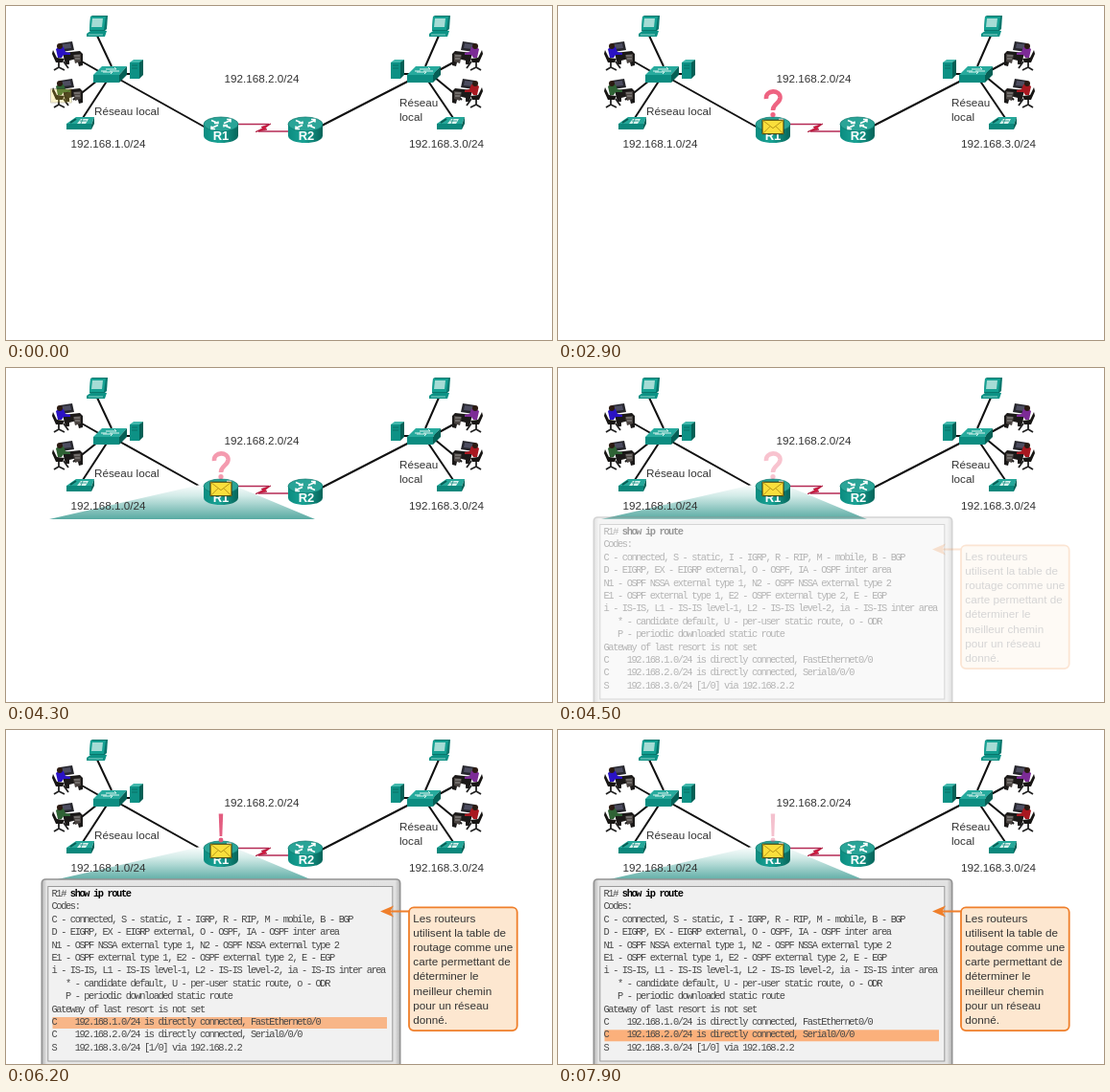
Animation, 569 px wide and 349 px high, one loop 8000 ms. Source, as an HTML page:

```html
<!DOCTYPE html>
<html lang="fr">
<head>
<meta charset="utf-8">
<title>Table de routage</title>
<style>
  html, body { margin: 0; width: 100%; height: 100%; overflow: hidden; background: #fff; }
  svg { display: block; width: 569px; height: 349px; }
  text { font: 11.7px "Liberation Sans", Arial, sans-serif; fill: #333; white-space: pre; }
  #console text { font: 10.4px "Liberation Mono", "Courier New", monospace; letter-spacing: -1.41px; fill: #484848; }
  text.router { font-weight: bold; font-size: 13px; fill: #fff; }
  .wire { fill: none; stroke: #111; stroke-width: 2; }
</style>
</head>
<body>
<svg viewBox="0 0 569 349">
  <defs>
    <linearGradient id="coneFill" x1="0" y1="0" x2="0" y2="1">
      <stop offset=".1" stop-color="#fff"/><stop offset=".4" stop-color="#d3ebe8"/><stop offset="1" stop-color="#58aaa2"/>
    </linearGradient>
    <linearGradient id="frameFill" x1="0" y1="0" x2="1" y2="0">
      <stop offset="0" stop-color="#b4b4b4"/><stop offset=".014" stop-color="#e6e6e6"/>
      <stop offset=".986" stop-color="#e2e2e2"/><stop offset="1" stop-color="#b4b4b4"/>
    </linearGradient>
    <linearGradient id="drum">
      <stop offset="0" stop-color="#0b8c80"/><stop offset=".45" stop-color="#1aa395"/><stop offset="1" stop-color="#056459"/>
    </linearGradient>
    <g id="pc">
      <path d="M4 2 6 1H22L21 15 19 17H3Z" fill="#08766c"/>
      <path d="M4 2H20L18 16H3Z" fill="#15a092"/>
      <path d="M6 4H17L16 13H5Z" fill="#a5dcd5"/>
      <path d="M0 20 4 17H21L19 23H0Z" fill="#0d9285"/>
      <path d="M2 21H17" stroke="#8fd5cc"/>
    </g>
    <g id="desk">
      <path d="M9 3 22 1 24 10 11 12Z" fill="#25252b"/>
      <path d="M11 4 20 3 21 8 12 9Z" fill="#4d4d60"/>
      <path d="M12 13 30 11 33 14V26L29 27 27 19 19 21V25H15Z" fill="#1b1918"/>
      <path d="M23 15 31 14V22L25 24Z" fill="#4a4441"/>
      <path d="M24 16H30M25 19H30" stroke="#aaa" stroke-width=".8"/>
      <path d="M5 9Q9 5 13 7L15 12 20 13V15L13 15 11 18H7Z" fill="currentColor"/>
      <circle cx="9" cy="6" r="3" fill="#2b1a12"/>
      <path d="M2 10 6 18 14 19 12 23H5L1 14Z" fill="#171513"/>
      <path d="M8 23V28M3 31 8 28 14 31M13 22 18 29" fill="none" stroke="#222" stroke-width="1.8"/>
    </g>
    <g id="switch">
      <path d="M0 9 9 0H35L27 9Z" fill="#27aa9d"/>
      <path d="M0 9H27V17H0Z" fill="#0c8d81"/>
      <path d="M27 9 35 0V9L27 17Z" fill="#056056"/>
      <path d="M13 3H24L22 1M27 5H17M10 6H20L18 8M8 5H14" fill="none" stroke="#d9f4ef"/>
    </g>
    <g id="server">
      <path d="M0 3 4 0H14L11 3Z" fill="#42b8ac"/>
      <path d="M0 3H10V20H0Z" fill="#0d9185"/>
      <path d="M10 3 14 0V16L10 20Z" fill="#056056"/>
      <path d="M2 6H8M2 9H8" stroke="#087066"/>
    </g>
    <g id="phone">
      <path d="M0 7 10 0H29L26 8Z" fill="#25a799"/>
      <path d="M0 7H26V13H0Z" fill="#0b887c"/>
      <path d="M26 8 29 0V7L26 13Z" fill="#056056"/>
      <path d="M15 2H23L20 7H11Z" fill="#d9f2ee"/>
      <path d="M14 4H21M17 2 15 7" stroke="#178f83" stroke-width=".8"/>
      <path d="M4 6 10 2" stroke="#075d54" stroke-width="2"/>
    </g>
    <g id="router">
      <path d="M-18 0V12C-18 22 18 22 18 12V0Z" fill="url(#drum)"/>
      <ellipse rx="18" ry="7.5" fill="#2aa497" stroke="#087469" stroke-width=".7"/>
      <path d="M-10-4-3-1M-7-1H-3V-3M10 4 3 1M7 1H3V3M3-1 10-4M6-5H10V-2M-3 1-10 4M-6 5H-10V2" fill="none" stroke="#fff" stroke-width="1.5"/>
    </g>
  </defs>

  <path class="wire" d="M95 31 110 63M79 58 100 70M70 98 100 74M80 117 106 77M120 71H131M117 76 208 127"/>
  <path class="wire" d="M451 31 437 63M468 58 446 70M475 98 446 74M466 117 439 77M424 71H412M426 75 329 125"/>
  <path d="M242 123.5H274M263 131H295" stroke="#b52b55" stroke-width="1.5"/>
  <path d="M276 123 266 126.5 268 127.5 260 131.5 272 129 270 127.5Z" fill="#d5183f" stroke="#a51235" stroke-width=".7"/>

  <path id="cone" d="M224 117 45 158H322Z" fill="url(#coneFill)"/>

  <use href="#pc" x="84" y="9"/><use href="#pc" x="441" y="9"/>
  <use href="#desk" transform="translate(47 36)" color="#2a12c4"/>
  <use href="#desk" transform="translate(47 75)" color="#2f6335"/>
  <use href="#desk" transform="translate(498 36) scale(-1 1)" color="#7c2b96"/>
  <use href="#desk" transform="translate(498 75) scale(-1 1)" color="#a81820"/>
  <use href="#server" x="129" y="56"/><use href="#server" x="401" y="56"/>
  <use href="#switch" x="91" y="63"/><use href="#switch" x="418" y="63"/>
  <use href="#phone" x="63" y="116"/><use href="#phone" x="449" y="116"/>
  <use href="#router" x="224" y="123.5"/><use href="#router" x="312" y="123.5"/>
  <text class="router" x="224" y="140" text-anchor="middle">R1</text>
  <text class="router" x="313" y="140" text-anchor="middle">R2</text>

  <text x="92" y="114">Réseau local</text>
  <text x="67.5" y="148">192.168.1.0/24</text>
  <text x="227.5" y="80">192.168.2.0/24</text>
  <text x="410" y="105">Réseau</text>
  <text x="410" y="120">local</text>
  <text x="420" y="148">192.168.3.0/24</text>

  <g id="question">
    <path d="M217 97C216 87 232 87 231.5 96C231 102 224 102 224 109" fill="none" stroke="#ee5c7c" stroke-width="4.6"/>
    <circle cx="224" cy="113.5" r="2.6" fill="#ee5c7c"/>
  </g>
  <g id="exclamation" fill="#e2557a">
    <path d="M221.7 87.5H226.2L225.3 111H222.6Z"/><circle cx="224" cy="115" r="2.4"/>
  </g>

  <g id="envelope">
    <path d="M-11-7.5H11V7H-11Z" fill="#fadf3c" stroke="#3c3000"/>
    <path d="M-11-7.5 0 1 11-7.5M-11 7-3-1M11 7 3-1" fill="none" stroke="#b08f14" stroke-width=".9"/>
  </g>

  <g id="console">
    <rect x="37.3" y="156" width="373.4" height="200" rx="4" fill="url(#frameFill)" stroke="#929292" stroke-width="1.6"/>
    <rect x="43.8" y="163.5" width="359" height="182.5" fill="#f1f1f1" stroke="#999"/>
    <rect id="row1" x="48.5" y="300" width="348.5" height="12" fill="#f8b688"/>
    <rect id="row2" x="48.5" y="313.3" width="348.5" height="12" fill="#fbb07b"/>
  </g>

  <g id="note">
    <rect x="420" y="185.3" width="112.7" height="128.8" rx="5" fill="#fde7d0" stroke="#ef7f2b" stroke-width="1.8"/>
    <path d="M420 188.5H401L404 183.5 390 189.5 404 195.5 401 190.5H420Z" fill="#ef7f2b"/>
  </g>
</svg>
<script>
  const el = id => document.getElementById(id);

  function addLines(parent, lines, x, y, pitch) {
    lines.forEach((line, i) => {
      const text = document.createElementNS("http://www.w3.org/2000/svg", "text");
      text.setAttribute("x", x);
      text.setAttribute("y", y + i * pitch);
      text.innerHTML = line;
      parent.append(text);
    });
  }

  addLines(el("console"), [
    'R1# <tspan font-weight="bold" fill="#000">show ip route</tspan>',
    "Codes:",
    "C - connected, S - static, I - IGRP, R - RIP, M - mobile, B - BGP",
    "D - EIGRP, EX - EIGRP external, O - OSPF, IA - OSPF inter area",
    "N1 - OSPF NSSA external type 1, N2 - OSPF NSSA external type 2",
    "E1 - OSPF external type 1, E2 - OSPF external type 2, E - EGP",
    "i - IS-IS, L1 - IS-IS level-1, L2 - IS-IS level-2, ia - IS-IS inter area",
    "   * - candidate default, U - per-user static route, o - ODR",
    "   P - periodic downloaded static route",
    "Gateway of last resort is not set",
    "C    192.168.1.0/24 is directly connected, FastEthernet0/0",
    "C    192.168.2.0/24 is directly connected, Serial0/0/0",
    "S    192.168.3.0/24 [1/0] via 192.168.2.2"
  ], 47.5, 174, 13.4);

  addLines(el("note"), [
    "Les routeurs", "utilisent la table de", "routage comme une", "carte permettant de",
    "déterminer le", "meilleur chemin", "pour un réseau", "donné."
  ], 424.3, 200.5, 15.2);

  const LOOP = 8000, STEP = 100;
  const route = [[900, 57.5, 94], [1300, 95.5, 77.5], [1600, 122.3, 79.5], [2200, 177.5, 106], [2700, 224, 126.7]];

  const ramp = (t, from, to) => Math.min(1, Math.max(0, (t - from) / (to - from)));
  const fade = (id, opacity) => el(id).setAttribute("opacity", opacity);

  function routePoint(t) {
    let [, x, y] = route[0];
    for (let i = 1; i < route.length; i++) {
      const [t0, x0, y0] = route[i - 1], [t1, x1, y1] = route[i];
      const k = ramp(t, t0, t1);
      x += (x1 - x0) * k;
      y += (y1 - y0) * k;
    }
    return [x, y];
  }

  function draw(t) {
    el("envelope").setAttribute("transform", `translate(${routePoint(t)})`);
    fade("envelope", 0.25 + 0.75 * ramp(t, 400, 900));

    const pulse = 0.65 + 0.3 * Math.cos((t - 6200) / 1100 * 2 * Math.PI);
    fade("question", t < 4700 ? pulse * ramp(t, 2600, 2800) : 0);
    fade("exclamation", t < 4700 ? 0 : pulse);

    const grow = ramp(t, 3100, 4200);
    el("cone").setAttribute("transform", `translate(224 117) scale(${grow}) translate(-224 -117)`);
    fade("cone", grow > 0 ? 1 : 0);

    fade("console", ramp(t, 4300, 4800));
    fade("note", ramp(t, 4400, 4900));
    fade("row1", ramp(t, 5200, 5900) * (1 - ramp(t, 6400, 7100)));
    fade("row2", ramp(t, 7000, 7800));
  }

  const start = performance.now();
  function tick() {
    const t = (performance.now() - start) % LOOP;
    draw(Math.floor(t / STEP) * STEP);
    requestAnimationFrame(tick);
  }
  tick();
</script>
</body>
</html>
```
